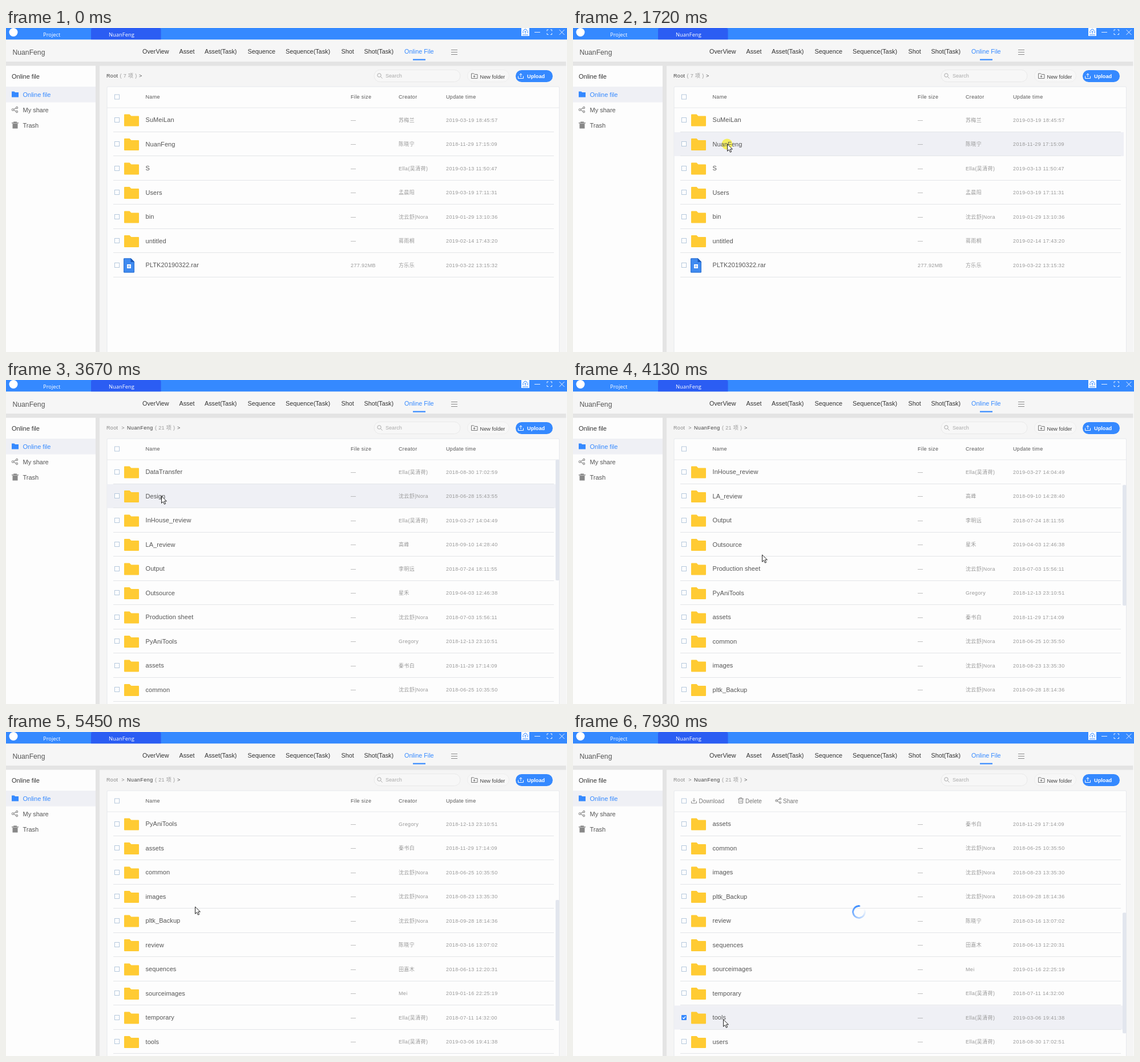
Animation, 983 px wide and 569 px high, one loop 8 s. Source, as an HTML page:

```html
<!DOCTYPE html>
<html lang="en">
<head>
<meta charset="utf-8">
<title>Online file browser</title>
<style>
html, body { margin: 0; width: 100%; height: 100%; overflow: hidden; background: #f5f5f5; }
svg { position: absolute; left: 0; top: 0; display: block; }
text { font-family: "Liberation Sans", "Noto Sans CJK SC", "Noto Sans CJK", sans-serif; white-space: pre; }
#spin {
  position: absolute; left: 489px; top: 304px; width: 24px; height: 24px; border-radius: 50%;
  background: conic-gradient(rgba(53,137,255,0) 8%, #3589ff 92%, rgba(53,137,255,0) 96%);
  -webkit-mask: radial-gradient(circle, transparent 8.5px, #000 9.2px);
  mask: radial-gradient(circle, transparent 8.5px, #000 9.2px);
}
</style>
</head>
<body>
<svg id="stage" width="983" height="569" viewBox="0 0 983 569">
  <g id="frame"></g>
  <g id="table"></g>
  <circle id="glow" r="9.5" fill="#f5ee2c" opacity=".75"/>
  <g id="names"></g>
  <path id="cursor" d="M.5 0V12.3L3.4 9.6L5.5 14.2L7.6 13.2L5.5 8.8H9.4Z" fill="#fff" stroke="#222" stroke-width="1"/>
</svg>
<div id="spin"></div>
<script>
const BLUE = '#3589ff', GREY = '#999', DARK = '#555';
const ROW = 42.5, TOP = 140;
const $ = id => document.getElementById(id);

const text = (x, mid, str, size, fill, extra = '') =>
  `<text x="${x}" y="${mid + size * .36}" font-size="${size}" fill="${fill}" ${extra}>${str.replace(/>/g, '&gt;')}</text>`;
const small = (x, mid, str, fill) => text(x, mid, str, 9, fill, 'letter-spacing=".37"');
const rect = (x, y, w, h, fill, extra = '') =>
  `<rect x="${x}" y="${y}" width="${w}" height="${h}" fill="${fill}" ${extra}/>`;
const line = (d, stroke, w = 1) => `<path d="${d}" fill="none" stroke="${stroke}" stroke-width="${w}"/>`;
const shape = (d, fill) => `<path d="${d}" fill="${fill}"/>`;

const shareIcon = (x, y, s) => `<g transform="translate(${x} ${y}) scale(${s})" fill="none" stroke="#888" stroke-width="1.1">
  <circle cx="2" cy="5.5" r="1.7"/><circle cx="9" cy="2" r="1.6"/><circle cx="9" cy="9" r="1.6"/>
  <path d="M3.5 4.7L7.6 2.7M3.5 6.3L7.6 8.3"/></g>`;

const folder = y => shape(`M207 ${y - 9}q0-1 1-1h8.5l3 3h12.5q1 0 1 1v16q0 1-1 1h-24q-1 0-1-1z`, '#ffcb33');
const archive = y => shape(`M206 ${y - 11}q0-1.5 1.5-1.5H219l6 6V${y + 11}q0 1.5-1.5 1.5h-16q-1.5 0-1.5-1.5z`, '#3f8af0') +
  line(`M206.5 ${y - 12}H219L224.5 ${y - 6.5}V${y + 12}H206.5Z`, '#2a6fd0') +
  shape(`M218.5 ${y - 12.5}l6.5 6.5h-6.5z`, '#1d58b4') +
  rect(212, y - 2, 7, 7, '#fff') + line(`M213.5 ${y + .5}h4M213.5 ${y + 2.5}h4`, '#3f8af0', .8);
const checkbox = (y, on) => on
  ? rect(190, y - 4.5, 9, 9, BLUE, 'rx="1"') + line(`M192 ${y}l2 2L197.3 ${y - 2}`, '#fff', 1.2)
  : rect(190.5, y - 4, 8, 8, '#fff', 'stroke="#b5c8dc"');

const ella = 'Ella(吴清荷)', nora = '沈云舒|Nora', chen = '陈晓宁';
const rootFiles = [
  ['SuMeiLan', '苏梅兰', '2019-03-19 18:45:57'],
  ['NuanFeng', chen, '2018-11-29 17:15:09'],
  ['S', ella, '2019-03-13 11:50:47'],
  ['Users', '孟晨阳', '2019-03-19 17:11:31'],
  ['bin', nora, '2019-01-29 13:10:36'],
  ['untitled', '蒋雨桐', '2019-02-14 17:43:20'],
  ['PLTK20190322.rar', '方乐乐', '2019-03-22 13:15:32', '277.92MB']
];
const projectFiles = [
  ['DataTransfer', ella, '2018-08-30 17:02:59'],
  ['Design', nora, '2018-06-28 15:43:55'],
  ['InHouse_review', ella, '2019-03-27 14:04:49'],
  ['LA_review', '高峰', '2018-09-10 14:28:40'],
  ['Output', '李明远', '2018-07-24 18:11:55'],
  ['Outsource', '星禾', '2019-04-03 12:46:38'],
  ['Production sheet', nora, '2018-07-03 15:56:11'],
  ['PyAniTools', 'Gregory', '2018-12-13 23:10:51'],
  ['assets', '秦书白', '2018-11-29 17:14:09'],
  ['common', nora, '2018-06-25 10:35:50'],
  ['images', nora, '2018-08-23 13:35:30'],
  ['pltk_Backup', nora, '2018-09-28 18:14:36'],
  ['review', chen, '2018-03-16 13:07:02'],
  ['sequences', '田嘉木', '2018-06-13 12:20:31'],
  ['sourceimages', 'Mei', '2019-01-16 22:25:19'],
  ['temporary', ella, '2018-07-11 14:32:00'],
  ['tools', ella, '2019-03-06 19:41:38'],
  ['users', ella, '2018-08-30 17:02:51']
];

function drawFrame() {
  const tabFont = 'style="font-family:\'Open Sans\',\'Noto Sans\',sans-serif"';
  const nav = [[239, 'OverView'], [303.5, 'Asset'], [348, 'Asset(Task)'], [423.5, 'Sequence'],
    [490, 'Sequence(Task)'], [587.5, 'Shot'], [627.5, 'Shot(Task)'], [698, 'Online File']];
  $('frame').innerHTML =
    // title bar
    rect(0, 0, 983, 20.5, BLUE) + shape('M149 20.5V3q0-3 3-3H268.500q3 0 3 3V20.5z', '#2b5df3') +
    '<circle cx="13" cy="7.500" r="7.500" fill="#fff"/>' +
    text(65, 12, 'Project', 9.4, '#fff', tabFont) + text(180, 12, 'NuanFeng', 9.4, '#fff', tabFont) +
    rect(903, 0, 14, 14, '#fff') +
    line('M907 8.500h-1q-1.500-2.500 1-3.500q.5-3 3-3t3 3q2.500 1 1 3.500h-1M910 10V5.500M908.500 7l1.500-1.500l1.500 1.500M905 12h10', BLUE) +
    line('M926 7.500h10M948 5.500V3h2.500M954 3h2.500v2.500M956.500 9v2.500H954M950.500 11.500H948V9M969.500 3l9 9M978.500 3l-9 9', '#e4efff') +
    // header
    rect(0, 20.5, 983, 39, '#f6f6f6') + rect(0, 59, 983, 7.500, '#e4e4e4') +
    text(11.5, 43, 'NuanFeng', 12.2, DARK) +
    nav.map(([x, s]) => text(x, 41, s, 10.8, x > 690 ? BLUE : '#333')).join('') +
    rect(713, 54.5, 22, 2.2, BLUE) + line('M780 38.500h11M780 42.500h11M780 46.500h11', '#888') +
    // sidebar
    rect(0, 66.5, 157, 503, '#fdfdfd') + rect(157, 59, 7, 510, '#e4e4e4') +
    rect(0, 103, 157, 27.5, '#eff0f5') + rect(981.5, 59, 1.5, 510, '#f9f9f9') +
    text(10, 85, 'Online file', 11, '#333') + text(29.5, 117, 'Online file', 11, BLUE) +
    text(29.5, 144, 'My share', 11, DARK) + text(29.5, 171.5, 'Trash', 11, DARK) +
    shape('M10 111.500h4.500l1.500 1.500h6v8.500H10z', BLUE) + shareIcon(10, 138, 1) +
    shape('M10 166h3v-1.500h6V166h3v1.500H10zM11.500 168h9v8.500h-9z', '#888') +
    // toolbar
    rect(645, 73.5, 151, 21, '#f7f7f7', 'rx="10.500" stroke="#e9e9e9"') +
    '<circle cx="654" cy="83" r="3.200" fill="none" stroke="#aaa"/>' + line('M656.500 85.500l3 3', '#aaa') +
    text(665, 84, 'Search', 9.1, '#aaa') +
    rect(808.5, 73.5, 73, 21, '#f7f7f7', 'rx="10.500" stroke="#eee"') +
    line('M815.500 80h4l1.500 1.500h5v7h-10.500zM818.500 85h4M820.500 83v4', '#777') +
    text(830.5, 85.5, 'New folder', 9.2, '#444') +
    rect(893, 74, 65, 21, BLUE, 'rx="10.500"') +
    line('M897.500 84.500v4h9v-4M902 86V80M899.700 82.300l2.300-2.300l2.300 2.300', '#fff') +
    text(913, 84.5, 'Upload', 9.2, '#fff', 'font-weight="700"') +
    // table panel
    rect(177, 103, 792.5, 480, '#fdfdfd', 'rx="2" stroke="#e6e8ec"');
}

function drawTable({ inside, scroll, hover, selected }) {
  const files = (inside ? projectFiles : rootFiles).slice(scroll, scroll + 10);
  const crumbs = inside
    ? small(176, 84, 'Root  >', '#888') + text(212, 84, 'NuanFeng', 9, '#444', 'letter-spacing=".45"') +
      small(261, 84, '( 21 项 )', GREY) + small(300, 84, '>', DARK)
    : small(176, 84, 'Root', '#444') + small(199.5, 84, '( 7 项 )', GREY) + small(233, 84, '>', DARK);
  const head = selected >= 0
    ? line('M207.500 121.500v3.500h9v-3.500M212 116v6M209.700 119.700l2.300 2.300l2.300-2.300', '#888') +
      line('M289 117.500h10M292 117v-1.500h4V117M290.500 118v7h7v-7M293 120v3M295.500 120v3', '#888') +
      shareIcon(354.5, 115.5, .95) + text(220.5, 121, 'Download', 10, '#777') +
      text(302, 121, 'Delete', 10, '#777') + text(368, 121, 'Share', 10, '#777')
    : [[244.5, 'Name'], [604, 'File size'], [688, 'Creator'], [771, 'Update time']]
        .map(([x, s]) => small(x, 121, s, DARK)).join('');
  let out = crumbs + checkbox(121, false) + head + line(`M177 ${TOP}H969`, '#e6e8ec');
  let names = '';
  files.forEach(([name, creator, date, size], i) => {
    const y = TOP + ROW * i, mid = y + 21.5, bottom = Math.round(y + ROW) - .5;
    if (i === hover) out += rect(177, y + .5, 788, ROW - .5, '#eff0f5');
    out += line(`M188 ${bottom}H960`, '#e3e5e8') + checkbox(Math.round(mid) - .5, i === selected) +
      (size ? archive(mid + .5) : folder(mid)) +
      small(604, mid, size || '—', GREY) + small(688, mid, creator, GREY) + small(771, mid, date, GREY);
    names += text(244.5, mid, name, 11, DARK, 'letter-spacing=".08"');
  });
  if (inside) out += rect(963, TOP + 22.15 * scroll, 6.5, 212, '#e2e6ee', 'rx="2"');
  $('table').innerHTML = out;
  $('names').innerHTML = names;
}

// time, x, y of the pointer
const track = [[400, 837, 534], [1170, 280, 205], [1320, 270, 204], [3600, 270, 204],
  [3670, 272, 204], [4050, 331, 307], [6100, 331, 307], [6610, 263, 505]];
const scrollTimes = [4050, 4130, 4590, 4990, 5060, 5060, 5450, 5600];

function pointer(t) {
  const i = track.findIndex(k => k[0] > t);
  if (i < 0) return track[track.length - 1].slice(1);
  if (i === 0) return track[0].slice(1);
  const [a, b] = [track[i - 1], track[i]];
  const p = (t - a[0]) / (b[0] - a[0]), e = p * p * (3 - 2 * p);
  return [a[1] + (b[1] - a[1]) * e, a[2] + (b[2] - a[2]) * e];
}

const between = (t, a, b) => t >= a && t < b;
const show = (el, on) => el.style.display = on ? '' : 'none';
let lastKey;

function render() {
  const t = performance.now() % 8000;
  const [x, y] = pointer(t);
  const inside = t >= 2420;
  const canHover = t >= 400 && !between(t, 4050, 6100) && x < 965;
  const state = {
    inside,
    scroll: scrollTimes.filter(s => t >= s).length,
    hover: canHover ? Math.floor((y - TOP) / ROW) : -1,
    selected: between(t, 1800, 2420) ? 1 : t >= 7390 ? 8 : -1
  };
  const key = JSON.stringify(state);
  if (key !== lastKey) drawTable(state);
  lastKey = key;

  const spinning = between(t, 1870, 2420) || t >= 7540;
  show($('cursor'), t >= 400);
  show($('glow'), between(t, 1720, 1950) || between(t, 7230, 7540));
  show($('spin'), spinning);
  $('cursor').setAttribute('transform', `translate(${x} ${y})`);
  $('glow').setAttribute('transform', `translate(${x} ${y})`);
  $('spin').style.transform = `rotate(${t * .4 + 99}deg)`;
  requestAnimationFrame(render);
}

drawFrame();
render();
</script>
</body>
</html>
```
